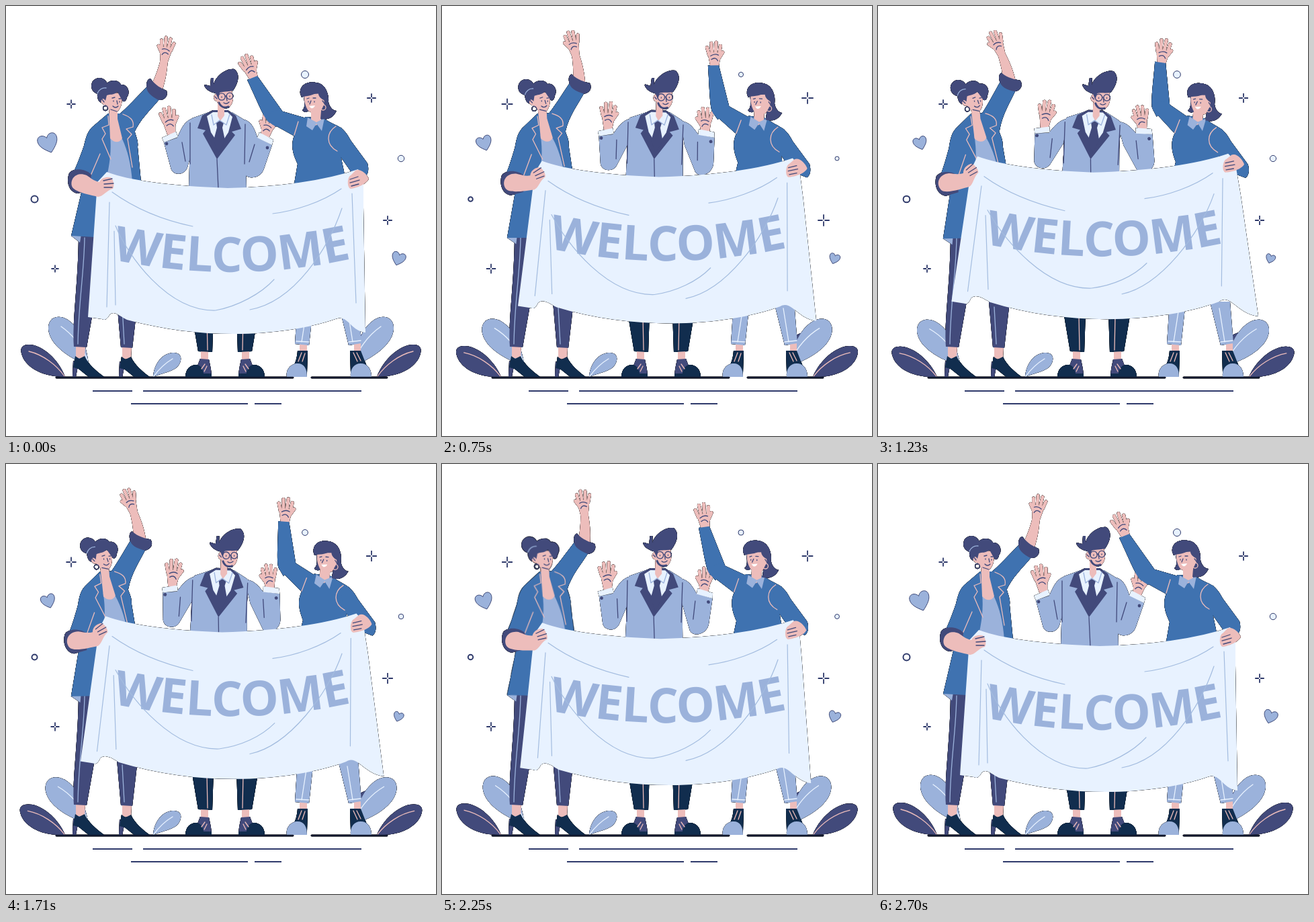
Recreate the animation shown at these times as an HTML page. Size 640 by 640 pixels, loop 2760 ms.

```html
<!DOCTYPE html>
<html lang="en">
<head>
<meta charset="utf-8">
<title>Welcome banner</title>
<style>
html, body { margin: 0; height: 100%; overflow: hidden; background: #fff; }
svg { display: block; width: 100vw; height: 100vh; }
#scene { filter: drop-shadow(0 0 .4px #000) drop-shadow(0 0 .3px #000); }
.blue { fill: #3f72b0; }
.navy { fill: #424a7b; }
.dark { fill: #112d4e; }
.pale { fill: #9bb2db; }
.skin { fill: #edbdbb; }
.ice { fill: #e8f2ff; }
.line { fill: none; stroke: #424a7b; stroke-width: 1.3; stroke-linecap: round; stroke-linejoin: round; }
.pink { stroke: #edbdbb; }
.white { stroke: #e8f2ff; }
.fold { stroke: #a3bcdf; stroke-width: 1.2; }
.soft { stroke: #9bb2db; }
.jaw { stroke-width: 3; }
.finger { stroke: #edbdbb; stroke-width: 4.8; }
.ground { stroke: #10182f; stroke-width: 2.6; }
.dash { stroke: #2f3a6b; stroke-width: 2; stroke-linecap: butt; }
.spark { stroke: #2f3a6b; vector-effect: non-scaling-stroke; }
text { font: 700 72px "Open Sans", "Noto Sans", sans-serif; fill: #9bb2db; text-anchor: middle; }
</style>
</head>
<body>
<!-- data-move: dx dy angle cx cy at full swing; data-to: path at full swing -->
<svg viewBox="0 0 640 640">
<defs>
  <g id="hand">
    <path class="skin" d="M-5 4L-8 -12C-9 -20 8 -22 9 -14L6 4Z"/>
    <path class="line finger" d="M-7 -15L-10 -26M-3 -18L-4 -32M2 -18L3 -33M7 -16L9 -28M5 -8L12 -19"/>
    <path class="line" d="M-5 -14Q1 -18 6 -15M-4 -9Q2 -13 5 -7"/>
  </g>
  <g id="leaves">
    <g data-move="0 0 -5 124 540">
      <path class="pale" d="M123 536C121 510 112 480 92 467C78 458 62 463 63 481C65 503 90 522 123 536Z"/>
      <path class="line white" d="M82 477C98 488 112 505 122 528"/>
    </g>
    <g data-move="0 0 -3 88 552">
      <path class="navy" d="M88 552C82 535 65 512 42 505C28 502 20 506 23 517C27 535 50 552 88 552Z"/>
      <path class="line pink" d="M34 514C55 519 75 534 87 551"/>
    </g>
  </g>
  <g id="heel">
    <path class="skin" d="M104 506H118L117 524H104Z"/>
    <path class="navy" d="M100 528L99 552H104L107 536Z"/>
    <path class="dark" d="M103 521L109 525L117 521C122 533 135 544 146 552H123L108 540L100 538Z"/>
  </g>
  <g id="manLeg">
    <path class="skin" d="M290 512H301V528H290Z"/>
    <path class="dark" d="M276 455H309L307 515L286 514Z"/>
    <path class="line pink" d="M299 462L300 512"/>
    <path class="navy" d="M284 538L289 525L302 526C304 535 306 545 306 552H288Z"/>
    <path class="dark" d="M267 552C267 540 275 534 283 534C290 534 294 542 294 547H306V553Z"/>
    <path class="line pink" d="M296 533L291 540M299 536L295 544"/>
  </g>
  <path id="arc" d="M136 372Q336 420 536 371"/>
</defs>

<g id="sparks"></g>
<path class="line dash" d="M129 573H188M204 573H529M186 592H360M370 592H410"/>

<g id="scene">
  <use href="#leaves"/>
  <path class="navy" d="M522 492L536 486L531 516L524 514Z"/>
  <use href="#leaves" transform="matrix(-1 0 0 1 640 0)"/>
  <path class="pale" d="M219 552C220 535 230 518 248 516C260 515 263 524 258 533C252 544 236 545 219 552Z"/>
  <path class="line white" d="M248 525C238 531 228 540 220 551"/>

  <!-- legs -->
  <use href="#heel"/><use href="#heel" x="69" y="1"/>
  <path class="navy" d="M108 338H134L132 440L120 508L101 507C98 470 108 410 108 338Z"/>
  <path class="navy" d="M165 440H196L188 509L171 508Z"/>
  <path class="line soft" d="M117 345C116 400 108 440 107 503M173 448L176 503"/>
  <use href="#manLeg"/><use href="#manLeg" transform="matrix(-1 0 0 1 652 0)"/>
  <path class="skin" d="M437 502H448V514H437ZM518 502H528V514H518Z"/>
  <path class="pale" d="M434 440H458L451 505L430 503ZM494 440H524L529 502L510 505Z"/>
  <path class="line white" d="M447 455L440 500M432 499L451 500M508 450L516 500M510 500L528 498"/>
  <path class="dark" d="M434 513H449L448 546L422 544C430 535 433 526 434 513ZM512 513H528L537 536L530 551L513 545Z"/>
  <path class="pale" d="M418 552C416 540 425 532 434 532C444 532 448 540 448 552ZM513 552C512 540 518 532 528 532C538 532 544 540 544 552Z"/>
  <path class="line pink" d="M440 516L435 529M445 517L441 529M517 516L523 529M522 516L528 528"/>
  <path class="line ground" d="M75 553H427M455 553H567"/>

  <!-- left woman -->
  <g data-move="0 3 -4.5 115 345">
    <path class="pale" d="M97 342L110 352L112 340Z"/>
    <g data-move="0 0 -11 180 172">
      <g data-move="0 0 -17.5 225 125">
        <path class="skin" d="M217 116C224 102 228 88 231 76L241 79C240 95 238 110 232 127Z"/>
        <use href="#hand" transform="translate(236 80) rotate(9) scale(-1 1)"/>
      </g>
      <path class="blue" d="M152 174L165 164C180 152 195 135 211 119L229 138C215 155 200 168 190 190Z"/>
      <path class="navy" d="M215 108C222 118 232 123 239 126C242 134 236 141 227 140C216 134 208 128 209 118C209 112 212 108 215 108Z"/>
    </g>
    <path class="blue" d="M152 160L132 177C121 185 119 196 116 208C109 228 104 240 101 246L128 262L112 278L97 342L133 344L150 262L201 262L196 210C198 200 191 190 190 178L176 160Z"/>
    <path class="pale" d="M155 192L173 198C181 215 186 235 188 262H148C155 235 157 215 155 192Z"/>
    <path class="skin" d="M153 148L166 156L166 168L173 197C169 204 161 204 155 197Z"/>
    <path class="line pink" d="M152 164L153 177L143 181L148 190L143 198L156 228M174 161C185 165 191 170 189 180L179 183L187 191L181 198L188 240M140 220L124 257"/>
    <g data-move="0 0 -3 158 158">
      <circle class="navy" cx="139" cy="119" r="12"/>
      <path class="skin" d="M148 128L172 130C174 140 172 152 166 157C158 159 151 153 148 147C142 148 138 138 143 135Z"/>
      <path class="navy" d="M138 141C133 131 138 122 146 121C150 109 167 108 171 117C181 116 186 128 180 136C179 143 174 144 172 139L166 128C160 133 154 131 150 133L148 141C145 136 142 137 141 144Z"/>
      <path class="line soft" d="M136 130C138 125 143 121 149 122"/>
      <path class="line" d="M158 137L162 136M168 138L171 138M165 141L166 146M159 149Q163 153 167 149M143 139L146 143M156 154L165 157M160 141V142M169 142V143"/>
      <circle class="line" cx="148" cy="152" r="3.5"/>
    </g>
  </g>

  <!-- man -->
  <g data-move="0 0 2 316 300">
    <g data-move="0 0 15 273 177">
      <use href="#hand" transform="translate(245 187) rotate(-9) scale(1.08)"/>
      <path class="pale" d="M276 168C265 172 260 184 255 196L235 203L245 240C247 253 266 253 270 240L280 205Z"/>
      <path class="ice" d="M232 196L253 187L256 195L235 203Z"/>
      <path class="line" d="M262 203L267 231"/>
      <circle class="navy" cx="239" cy="205" r="2.4"/>
    </g>
    <g data-move="0 0 -26 358 178">
      <use href="#hand" transform="translate(386 194) rotate(15) scale(-1.03 1.03)"/>
      <path class="pale" d="M355 169C366 173 370 183 374 195L396 207L384 242C379 258 358 259 354 248L350 205Z"/>
      <path class="ice" d="M377 188L398 199L396 207L374 196Z"/>
      <path class="line" d="M370 206L362 232"/>
      <circle class="navy" cx="389" cy="211" r="2.4"/>
    </g>
    <path class="pale" d="M302 158L277 167C273 170 273 185 274 200L272 275H358L356 200C358 185 360 173 354 169L336 158Z"/>
    <path class="line" d="M274 174L274 235M356 176L355 235M314 228L316 272"/>
    <path class="navy" d="M308 155L292 163L285 182L297 185L293 190L314 228L341 192L336 187L350 183L342 163L330 155Z"/>
    <path class="ice" d="M308 158L330 158L337 165L331 188L318 208L305 188L299 164Z"/>
    <path class="navy" d="M313 174L318 171L324 174L322 181L326 200L316 219L309 200L314 181Z"/>
    <path class="skin" d="M315 143L325 150V163L319 171L315 164Z"/>
    <path class="line soft" d="M306 162L309 177L318 170L328 177L333 161"/>
    <g data-move="1 1 3 320 155">
      <path class="skin" d="M311 126L336 124L338 138C337 149 330 154 323 152C317 149 315 145 314 142C308 141 308 133 312 131Z"/>
      <path class="navy" d="M300 125C296 121 294 118 296 117L304 119L305 107L309 107L309 117C312 104 328 92 340 94C351 103 343 119 338 126C330 128 322 127 318 129L316 138L312 130C307 129 303 127 300 125Z"/>
      <path class="line jaw" d="M317 144C320 151 326 152 331 150"/>
      <path class="line" d="M311 135L314 138M326 134L328 134M328 135L329 141M324 144Q328 147 332 143M321 135V136M333 134V135"/>
      <circle class="line" cx="321" cy="135" r="5.2"/><circle class="line" cx="333" cy="134" r="4.8"/>
    </g>
  </g>

  <!-- right woman -->
  <g data-move="0 0 4.8 475 345">
    <g data-move="0 0 14 440 182">
      <g data-move="0 0 12 400 163">
        <use href="#hand" transform="translate(368 107) rotate(-22) scale(1.05)"/>
        <path class="blue" d="M359 110L374 104L411 156L402 180L390 172C383 165 371 135 359 110Z"/>
      </g>
      <path class="blue" d="M390 172C387 163 396 152 409 156L450 168L440 198L428 193Z"/>
    </g>
    <path class="blue" d="M446 165L436 172L429 193C422 210 430 226 434 235L428 270H508L498 222L500 182C490 176 480 173 473 167Z"/>
    <g data-move="0 0 -5 492 190">
      <path class="blue" d="M485 176C500 178 508 190 513 200L538 234C541 245 538 252 534 254L513 246L492 216Z"/>
      <path class="line pink" d="M491 179C477 188 475 206 493 216"/>
    </g>
    <path class="line pink" d="M435 172L429 192"/>
    <path class="skin" d="M454 150H469V172L461 178L454 170Z"/>
    <path class="pale" d="M449 166L447 179L456 185L462 175L470 186L474 167L462 173Z"/>
    <g data-move="5 2 0">
      <path class="navy" d="M439 130C436 117 450 110 466 115C478 120 481 135 480 143C482 152 488 156 492 156C487 167 478 170 468 168L470 145L447 158C444 158 442 157 441 155C446 151 444 142 443 135Z"/>
      <path class="skin" d="M444 132L472 130L474 145L468 158C462 161 455 160 450 156C446 150 443 142 444 132Z"/>
      <path class="navy" d="M438 131C436 117 450 110 466 115C478 120 482 136 475 141C468 138 464 134 465 127C456 135 446 133 440 136Z"/>
      <path class="line" d="M448 138L451 137M457 137L461 137M454 141L452 146M450 142V143M459 142V143M471 141L474 145"/>
      <path fill="#fff" d="M451 149L460 148Q458 153 454 152Z"/>
      <circle class="line pink" cx="472" cy="151" r="4"/>
    </g>
  </g>

  <!-- banner -->
  <path class="ice" d="M150 247Q200 266 330 271Q450 268 524 243L532 257L532 300L535 486C525 486 515 476 510 471C503 464 497 463 490 466C420 490 300 500 180 467C170 462 160 452 154 460C150 467 147 468 143 466L122 463L136 262Z"
    data-to="M148 223Q200 242 320 247Q450 243 521 219L531 229L540 280L567 461C552 460 540 450 528 441C520 435 514 435 509 439C430 469 290 479 166 440C158 435 145 427 138 434C135 441 132 444 128 442L109 439L139 242Z"/>
  <text data-move="0 -24 0"><textPath href="#arc" startOffset="50%">WELCOME</textPath></text>
  <path class="line fold" d="M158 277C190 300 230 318 278 328M397 309C430 305 470 292 499 272M154 292L150 448M161 335L163 445M515 279L521 442"
    data-to="M158 253C190 276 230 293 278 304M397 286C430 282 470 268 498 248M154 267L133 424M160 311L164 421M513 256L511 416"/>
  <path class="line fold" d="M500 301C480 360 430 440 363 452M163 327C180 370 240 455 312 453C345 447 380 428 399 407"
    data-to="M500 279C480 338 420 416 363 428M163 303C190 350 250 421 318 419C350 415 380 402 400 382"/>

  <!-- hands on the banner -->
  <g data-move="0 3 -4.5 115 345">
    <path class="navy" d="M127 251C118 241 99 241 94 249C89 262 94 277 106 279L125 275Z"/>
    <g data-move="0 0 -25 102 265">
      <path class="skin" d="M120 252C106 246 95 256 98 268C101 277 125 281 137 284C144 284 150 274 159 272C162 269 160 256 155 255C148 254 142 256 139 262C132 261 126 256 120 252Z"/>
      <path class="line" d="M145 260L158 257M146 265L160 264M146 270L158 270"/>
    </g>
  </g>
  <g data-move="5 -24 6 522 260">
    <path class="skin" d="M520 245C527 241 537 250 540 257C537 265 522 271 513 272C507 270 508 254 513 252Z"/>
    <path class="line" d="M512 258L524 254M512 263L526 259M514 268L525 265"/>
  </g>
</g>
</svg>
<script>
const FRAME = 30, LOOP = 2760, HALF = 45;
const all = selector => [...document.querySelectorAll(selector)];
const mix = (a, b, k) => a + (b - a) * k;
const NUMBER = /-?\d+(\.\d+)?/g;

const movers = all('[data-move]').map(el => [el, el.dataset.move.split(' ').map(Number)]);
const morphs = all('[data-to]').map(el => [el, el.getAttribute('d'), el.dataset.to.match(NUMBER).map(Number)]);

const shapes = {
  plus: 'M1.3 0H8M-1.3 0H-8M0 1.3V8M0 -1.3V-8',
  dot: 'M-5 0A5 5 0 1 0 5 0A5 5 0 1 0 -5 0Z',
  heart: 'M0 15C-10 7 -15 1 -15 -6C-15 -15 -4 -16 0 -8C4 -16 15 -15 15 -6C15 1 10 7 0 15Z'
};
// shape, x, y, scale at rest, scale at the far end, fill, stroke width, angle
const sparks = [
  ['plus', 97, 146, .82, 1.05, 'none', 1.8, 0],
  ['plus', 544, 137, .85, 1.1, 'none', 1.8, 0],
  ['plus', 568, 319, .85, 1.1, 'none', 1.8, 0],
  ['plus', 73, 391, .7, .9, 'none', 1.8, 0],
  ['dot', 42.5, 287.5, 1, .65, 'none', 2, 0],
  ['dot', 588, 227, .95, .6, '#e8f2ff', 1, 0],
  ['dot', 445, 102, 1.1, .7, '#e8f2ff', 1, 0],
  ['heart', 63, 204, .98, .66, '#9bb2db', .9, -18],
  ['heart', 584, 376, .68, .46, '#9bb2db', .9, 18]
].map(([shape, x, y, from, to, fill, width, angle]) => {
  const el = document.createElementNS('http://www.w3.org/2000/svg', 'path');
  el.setAttribute('d', shapes[shape]);
  el.setAttribute('class', 'spark');
  el.style.fill = fill;
  el.style.strokeWidth = width;
  document.getElementById('sparks').append(el);
  return { el, x, y, from, to, angle, swings: shape === 'heart' };
});

function draw(now) {
  const step = Math.floor(now % LOOP / FRAME) % (2 * HALF);
  const swing = 1 - (1 - Math.min(step, 2 * HALF - step) / HALF) ** 1.45;
  const pulse = (1 - Math.cos(2 * Math.PI * step / HALF)) / 2;

  for (const [el, [dx, dy, angle, cx = 0, cy = 0]] of movers)
    el.setAttribute('transform', `translate(${dx * swing} ${dy * swing}) rotate(${angle * swing} ${cx} ${cy})`);
  for (const [el, from, to] of morphs) {
    let i = 0;
    el.setAttribute('d', from.replace(NUMBER, n => mix(+n, to[i++], swing).toFixed(2)));
  }
  for (const { el, x, y, from, to, angle, swings } of sparks)
    el.setAttribute('transform', `translate(${x} ${y}) rotate(${angle}) scale(${mix(from, to, swings ? swing : pulse)})`);
}

const start = performance.now();
(function tick() {
  draw(performance.now() - start);
  requestAnimationFrame(tick);
})();
</script>
</body>
</html>
```
